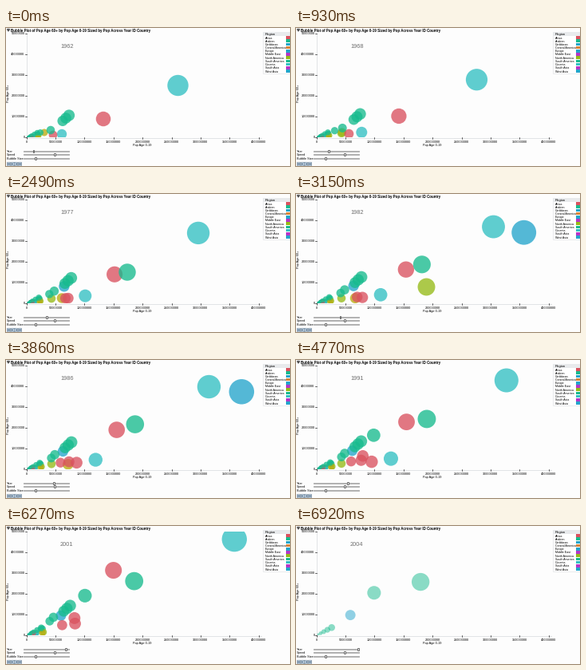
Write a matplotlib script that moves like this. It is 356 px wide and 173 px high and loops after 7020 ms.

```python
import numpy as np
import matplotlib.pyplot as plt
from matplotlib.animation import FuncAnimation
from matplotlib.patches import Circle, Polygon, Rectangle

W, H, DPI = 356, 173, 100
LOOP, TICK = 7020, 20
LEFT, RIGHT, TOP, BASE = 25.5, 320, 6.5, 137
DX, DY = 36.4, 26          # pixels per axis tick
LAST, FADE = 50, 48        # last step, and the step where the bubbles turn pale
FIRST_YEAR, LAST_YEAR = 1962, 2004

RED, GREEN, CYAN = "#da525f", "#18bb8e", "#33c0c3"
BLUE, OLIVE, YELLOW = "#25a5cc", "#96bb18", "#b9ac10"
ORANGE, PURPLE = "#d9853b", "#b637c8"
INK, PALE = "black", "#e2e4e6"

# playback runs in bursts of eight steps
BURSTS = [110, 1200, 2318, 3430, 4600, 5700, 6790]
CHANGES = np.interp(np.arange(1, LAST), 1 + 8 * np.arange(len(BURSTS)), BURSTS)
CHANGES = np.append(CHANGES, BURSTS[-1] + 130)

fig = plt.figure(figsize=(W / DPI, H / DPI), dpi=DPI, facecolor="#fdfdfd")
ax = fig.add_axes([0, 0, 1, 1])
ax.set_xlim(0, W)
ax.set_ylim(H, 0)
ax.axis("off")


def text(x, y, s, px=3.9, color=INK, ha="left", **kw):
    return ax.text(x, y, s, fontsize=px * 72 / DPI, color=color, ha=ha,
                   va="center_baseline", family="Liberation Sans", **kw)


def box(x, y, w, h, face, edge="none", lw=0.5):
    return ax.add_patch(Rectangle((x, y), w, h, facecolor=face, edgecolor=edge, linewidth=lw))


def line(x0, y0, x1, y1, color=PALE, width=1):
    ax.plot([x0, x1], [y0, y1], color=color, lw=width * 72 / DPI, zorder=1)


def knob(x, y):
    return ax.add_patch(Rectangle((x - 0.8, y - 1.5), 1.6, 3, facecolor="#eeeeee",
                                  edgecolor="#444444", linewidth=0.5, zorder=3))


def draw_title():
    ax.add_patch(Polygon([(1.5, 1.5), (4.5, 1.5), (3, 4)], color="#555555"))
    text(6, 2.8, "Bubble Plot of Pop Age 60+ by Pop Age 0-19 Sized by Pop Across Year ID Country",
         4.5, weight="bold")


def draw_axes():
    line(LEFT, TOP, LEFT, BASE + 0.5)
    line(LEFT, BASE + 0.5, RIGHT, BASE + 0.5)
    for k in range(9):
        x = LEFT + DX * k
        line(x, BASE, x, BASE + 1.5, INK, 0.6)
        text(x, 142, str(k * 50_000_000), ha="center")
    for k in range(6):
        y = BASE - DY * k
        line(LEFT - 1.5, y, LEFT, y, INK, 0.6)
        text(LEFT - 2, y, str(k * 10_000_000), ha="right")
    text(171, 146.3, "Pop Age 0-19", ha="center")
    text(3.2, 72, "Pop Age 60+", ha="center", rotation=90)


def draw_legend():
    regions = ["Africa", "Arabian", "Caribbean", "Central America", "Europe", "Middle East",
               "North America", "South America", "Oceania", "South Asia", "West Asia"]
    colors = [RED, GREEN, BLUE, ORANGE, BLUE, PURPLE, OLIVE, GREEN, CYAN, PURPLE, BLUE]
    box(321.5, 4.5, 36, 52, "white", PALE)
    box(322, 5, 34, 5, "#e8eaec")
    text(325, 7.5, "Region", 4.2)
    for k, (region, color) in enumerate(zip(regions, colors)):
        y = 12 + 4.2 * k
        text(325, y, region, 3.6)
        box(351, y - 1.8, 5, 3.6, color)


def draw_controls():
    for k, name in enumerate(("Year", "Speed", "Bubble Size")):
        y = 154 + 4.8 * k
        text(1, y, name)
        box(22, y - 0.5, 57, 1, "white", "#777777", 0.4)
    knob(61, 158.8)
    knob(37, 163.6)
    for k in range(4):
        x = 0.8 + 4.8 * k
        box(x, 168, 4, 4, "#c4d6e6", "#71869a")
        line(x + 1.2, 170, x + 2.8, 170, "#3d5a78")


class Bubble:
    """A country on a smooth path through points spread evenly over its life."""

    def __init__(self, color, life, *points):
        self.life = life
        steps = np.linspace(*life, len(points))
        self.path = np.polyfit(steps, np.array(points, float), len(points) - 1)
        self.dot = ax.add_patch(Circle((0, 0), facecolor=color, edgecolor="none", zorder=2))
        self.dot.set_clip_path(plot_area)

    def show(self, step):
        x, y = np.polyval(self.path, step)
        millions = 50 * (x - LEFT) / DX + 10 * (BASE - y) / DY
        self.dot.set_visible(self.life[0] <= step < self.life[1])
        self.dot.set_center((x, y))
        self.dot.set_radius(0.78 * np.sqrt(max(millions, 0)))
        self.dot.set_alpha(0.78 if step < FADE else 0.5)


def small_countries():
    """A crowd along a diagonal near the corner; a few greens stay to the end."""
    rng = np.random.default_rng(8)
    for color in [GREEN] * 9 + [OLIVE] * 4 + [CYAN] * 3 + [BLUE] * 2 + [RED, YELLOW]:
        u = 2 + 22 * rng.random() ** 1.5
        slope = rng.uniform(0.3, 0.5) if color == GREEN else rng.uniform(0.15, 0.32)
        yield Bubble(color, (0, FADE - 1), (26 + 0.7 * u, BASE - 0.5 * slope * u),
                     (26 + u, BASE - 1.1 * slope * u))
    for k in range(5):
        u = 2 + 2.6 * k + 0.4 * k * k
        yield Bubble(GREEN, (0, LAST + 1), (26 + 0.7 * u, BASE - 0.3 * u),
                     (26 + u, BASE - 0.52 * u))


def middle_countries():
    gone = FADE - 1
    yield Bubble(BLUE, (17, LAST + 1), (73, 116), (68, 111.5))
    yield Bubble(CYAN, (0, 37), (70, 133), (100, 127.5), (122, 123))
    yield Bubble(YELLOW, (0, 32), (48, 131), (68, 130.5), (80, 131))
    yield Bubble(OLIVE, (6, 44), (57, 132), (57, 129))
    yield Bubble(RED, (0, 37), (59, 134), (98, 127))
    yield Bubble(RED, (17, 46), (74, 131), (87, 122))
    yield Bubble(RED, (25, 46), (68, 129.5), (70.5, 124))
    yield Bubble(RED, (30, 46), (83, 122), (86, 115))
    yield Bubble(GREEN, (0, gone), (56, 128), (61, 120), (59, 114))
    yield Bubble(GREEN, (0, gone), (43, 131), (56, 124), (54, 119))
    for k in (-1, 0, 1):
        shift = np.array([4, -3.5]) * k
        yield Bubble(GREEN, (0, gone), *(shift + [(75, 113), (78, 107.5), (76, 103)]))


def large_countries():
    yield Bubble(CYAN, (0, FADE), (215.5, 72), (238.5, 52), (260.5, 28), (294, 16))
    yield Bubble(BLUE, (19, 32), (278, 55), (303, 33))
    yield Bubble(RED, (0, FADE - 1), (122, 114), (138, 94), (133.5, 51))
    yield Bubble(OLIVE, (20, 26), (162, 117.5), (165, 115.5))
    yield Bubble(GREEN, (18, LAST + 1), (152, 98), (164, 73.5), (155, 70.5))
    yield Bubble(GREEN, (31, LAST + 1), (96, 96), (99, 90), (97.5, 83))


draw_title()
draw_axes()
draw_legend()
draw_controls()

plot_area = Rectangle((LEFT + 0.5, TOP + 0.5), RIGHT - LEFT, BASE - TOP - 0.2,
                      transform=ax.transData)
bubbles = [*small_countries(), *middle_countries(), *large_countries()]
year_text = text(68, 22.3, "", 7.4, "#707070")
thumb = knob(0, 154)


def update(frame):
    step = np.searchsorted(CHANGES, (frame + 1) * TICK, side="right")
    year = min(FIRST_YEAR + 0.875 * step, LAST_YEAR)
    year_text.set_text(str(int(year)))
    thumb.set_x(21.2 + 56 * (year - 1950) / (LAST_YEAR - 1950))
    for bubble in bubbles:
        bubble.show(step)
    return [b.dot for b in bubbles] + [year_text, thumb]


anim = FuncAnimation(fig, update, frames=LOOP // TICK, interval=TICK,
                     init_func=lambda: update(0), repeat=True, repeat_delay=0)
plt.show()
```
